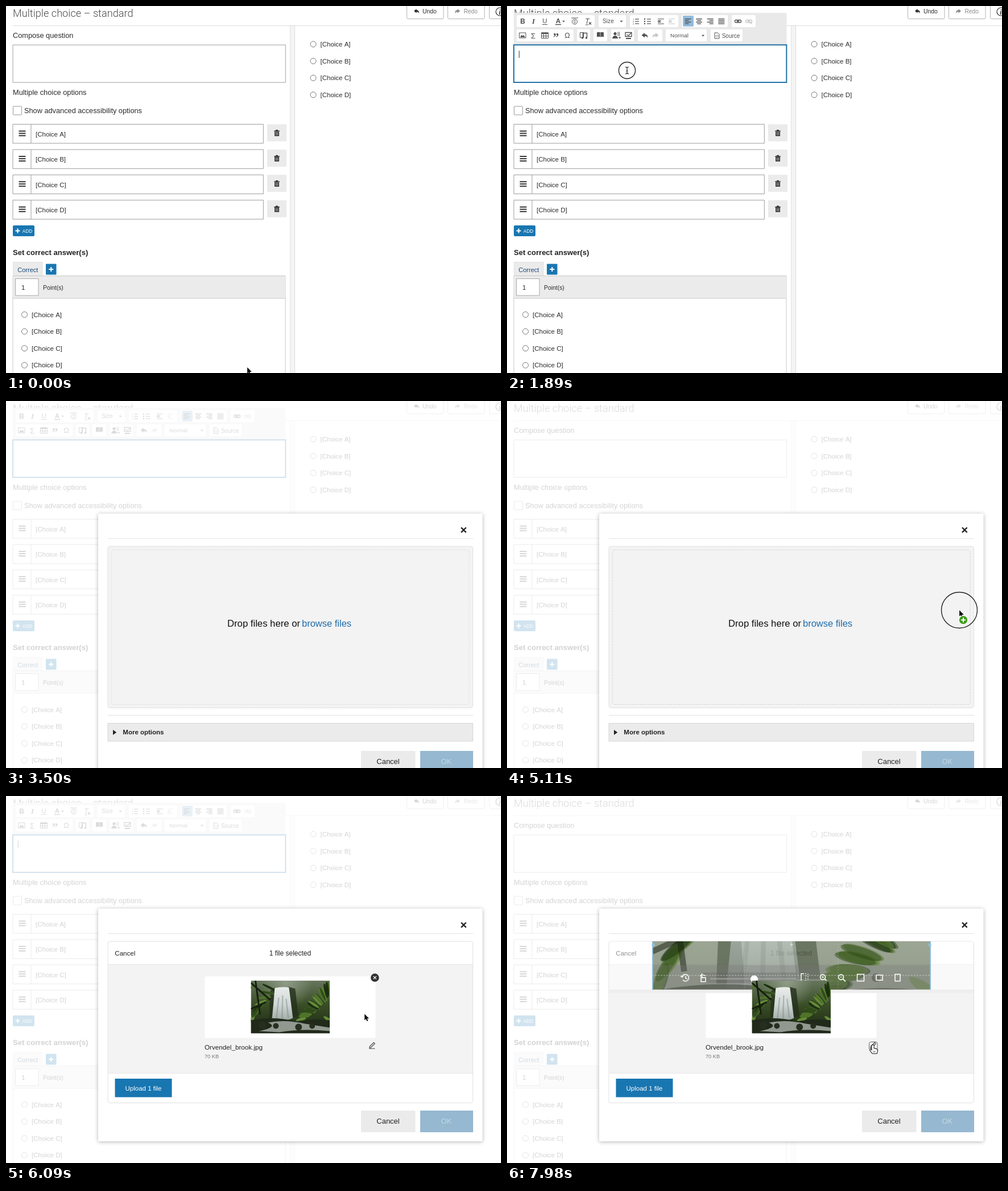
An HTML page with a canvas for the animation above (8 s loop, 870 by 644 pixels).

```html
<!DOCTYPE html>
<html lang="en">
<head>
<meta charset="utf-8">
<title>Question editor</title>
<style>
html, body { margin: 0; width: 100%; height: 100%; overflow: hidden; background: #fff; }
canvas { display: block; width: 870px; height: 644px; }
</style>
</head>
<body>
<canvas id="stage" width="870" height="644"></canvas>
<script>
const c = document.getElementById('stage').getContext('2d');
const LOOP = 8000;
const BLUE = '#1876b1', GREY = '#ebebeb', INK = '#2b2b2b', ICON = '#505050', PALE = '#c6c6c6';
const SANS = '"Liberation Sans", Arial, sans-serif';

// ---- helpers ----
function box(x, y, w, h, fill, stroke, r = 0, lw = 1) {
  c.beginPath();
  c.roundRect(x, y, w, h, r);
  if (fill) { c.fillStyle = fill; c.fill(); }
  if (stroke) { c.strokeStyle = stroke; c.lineWidth = lw; c.stroke(); }
}
function disc(x, y, r, fill, stroke, lw = 1) {
  c.beginPath();
  c.arc(x, y, r, 0, 7);
  if (fill) { c.fillStyle = fill; c.fill(); }
  if (stroke) { c.strokeStyle = stroke; c.lineWidth = lw; c.stroke(); }
}
function text(s, x, y, size, color = INK, style = '', align = 'left', family = SANS) {
  c.font = `${style} ${size}px ${family}`;
  c.textAlign = align;
  c.fillStyle = color;
  c.fillText(s, x, y);
}
function icon(d, x, y, fill, stroke, lw = 1, sx = 1, sy = 1) {
  c.save();
  c.translate(x, y);
  c.scale(sx, sy);
  const p = new Path2D(d);
  if (stroke) { c.strokeStyle = stroke; c.lineWidth = lw; c.stroke(p); }
  if (fill) { c.fillStyle = fill; c.fill(p); }
  c.restore();
}
function line(x1, y1, x2, y2, color, lw = 1) {
  icon(`M${x1} ${y1}L${x2} ${y2}`, 0, 0, null, color, lw);
}
function plus(x, y, r, color, lw) {
  icon(`M${-r} 0H${r}M0 ${-r}V${r}`, x, y, null, color, lw);
}
function cross(x, y, r, color, lw) {
  icon(`M${-r} ${-r}L${r} ${r}M${r} ${-r}L${-r} ${r}`, x, y, null, color, lw);
}
function bars(x, y, widths, color, step = 3, lw = 1.3, left = -5) {
  widths.forEach((w, i) => c.fillRect(x + left, y + (i - (widths.length - 1) / 2) * step - lw / 2, w, lw, c.fillStyle = color));
}
const between = (t, a, b) => t >= a && t < b;

const UNDO = 'M-5-.8L0-5V-2.5C4-2.5 5.6.5 4 4.5C4 1.5 3 .7 0 .7V3.4Z';
const DOWN = 'M-2.6-1.3H2.6L0 1.6Z';

// ---- page ----
const LETTERS = ['A', 'B', 'C', 'D'];

function radios(x, y, gap) {
  LETTERS.forEach((l, i) => {
    disc(x, y + i * 29.6, 5, '#fff', '#777');
    text(`[Choice ${l}]`, x + gap, y + 4 + i * 29.6, 11.5);
  });
}

function page() {
  text('Multiple choice – standard', 12, 18.5, 18.2, '#4a4a4a', '300', 'left', 'Roboto, "Liberation Sans", sans-serif');
  line(12, 34.5, 870, 34.5, '#dcdcdc');
  box(704.5, -8, 64.5, 30.5, '#fff', '#b4b4b4', 2);
  box(776.5, -8, 64.5, 30.5, '#fff', '#b4b4b4', 2);
  box(849.5, -8, 40, 30.5, '#fff', '#b4b4b4', 2);
  icon(UNDO, 721.5, 9.5, INK, null, 1, .9, .9);
  text('Undo', 732, 13.3, 10.4);
  icon(UNDO, 793.5, 9.5, '#8a8a8a', null, 1, -.9, .9);
  text('Redo', 804.5, 13.3, 10.2, '#8a8a8a');
  disc(868, 10, 7, null, INK, 1.2);
  text('i', 868, 14.5, 12, INK, 'italic bold', 'center', '"Liberation Serif", serif');

  box(500, 35, 8, 609, '#f4f4f4');
  line(499.5, 35, 499.5, 644, '#e2e2e2');
  line(507.5, 35, 507.5, 644, '#dcdcdc');

  text('Compose question', 12, 55.7, 12.75);
  text('Multiple choice options', 12, 155.5, 12.8);
  box(12.5, 176, 15, 15, '#fff', '#999', 1);
  text('Show advanced accessibility options', 32, 188.3, 12.75);

  LETTERS.forEach((l, i) => {
    const y = 207.5 + i * 44.4;
    box(12, y, 440.3, 33.4, '#fff', '#9c9c9c');
    line(44, y, 44, y + 33.4, '#9c9c9c');
    bars(28.5, y + 16, [12, 12, 12], INK, 4, 1.9, -6);
    text(`[Choice ${l}]`, 52, y + 21.2, 11.5);
    box(459, y, 34, 30, GREY, null, 1);
    icon('M-5-4H5V-2.8H-5ZM-2-5.5H2V-4H-2ZM-4-2.4H4V5.5H-4Z', 476, y + 15.3, INK);
    for (const dx of [-2, 0, 2]) line(476 + dx, y + 14, 476 + dx, y + 19.4, '#ddd', .8);
  });

  box(12, 385, 38, 19, BLUE, null, 2);
  plus(20.5, 394.5, 4, '#fff', 2);
  text('ADD', 28.7, 397.7, 8.3, '#fff');

  text('Set correct answer(s)', 12, 437, 13, '#222', 'bold');
  box(12, 449, 52, 26, GREY);
  box(12.5, 449.5, 51.5, 26, null, '#e0e0e0');
  box(12, 473.5, 479, 200, '#fff', '#c9c9c9');
  box(12, 474, 479, 39, GREY);
  line(12, 513, 491, 513, '#c9c9c9');
  text('Correct', 20.3, 466.8, 11, '#1a4a78');
  box(70, 452.5, 18.5, 19, BLUE, null, 1);
  plus(79.3, 462, 4, '#fff', 2);
  box(16.5, 478.5, 40.5, 29.5, '#fff', '#a8a8a8');
  text('1', 27, 497.5, 11.5);
  text('Point(s)', 65, 497.5, 10.4);
  radios(32.5, 541.5, 12.5);
  radios(540, 67, 12.5);
}

// ---- rich text field ----
function toolbar(hover) {
  box(12, 12, 479.5, 56, '#e9e9e9', null, [3, 3, 0, 0]);
  const groups = [[[17, 154], [161, 209], [216, 301], [307, 388], [395, 437]],
    [[17, 117], [123, 146], [152, 176], [183, 223], [230, 273], [279, 351], [358, 414]]];
  groups.forEach((row, i) => row.forEach(([a, b]) => box(a, 16 + i * 25, b - a, 21, '#fff', null, 2)));

  text('B', 27.5, 30.7, 12, ICON, 'bold', 'center');
  text('I', 46.5, 30.7, 13, ICON, 'bold italic', 'center', '"Liberation Serif", serif');
  text('U', 66.5, 30, 11.5, ICON, '', 'center');
  line(62, 32.5, 71, 32.5, ICON);
  text('A', 90, 30, 11.5, ICON, 'bold', 'center');
  line(85, 32.5, 95, 32.5, ICON, 1.5);
  icon(DOWN, 99.5, 27, ICON, null, 1, .9, .9);
  disc(119, 27.5, 4.5, null, ICON);
  line(113, 21, 125, 21, ICON);
  line(117, 26, 121, 26, ICON);
  line(117, 29, 121, 29, ICON);
  text('T', 141, 30.5, 12, ICON, 'italic', 'center');
  cross(146, 30.5, 2, ICON, 1.1);
  line(138, 33, 143, 33, ICON);
  text('Size', 168, 30.3, 10.2, ICON);
  icon(DOWN, 201, 27, ICON);
  bars(228, 27, [7, 7, 7], ICON, 4, 1.2, -3);
  ['1', '2', '3'].forEach((n, i) => text(n, 221, 25 + i * 4, 4, ICON));
  bars(248, 27, [7, 7, 7], ICON, 4, 1.2, -2);
  for (const y of [23, 27, 31]) disc(242, y, 1.2, ICON);
  [[270, ICON, 1], [289, PALE, -1]].forEach(([x, col, s]) => {
    bars(x, 27, [11, 6, 6, 11], col, 2.8, 1);
    icon('M-5 0H-1M-3-2L-1 0L-3 2', x + (s < 0 ? -5 : 0), 27, null, col, 1, s);
  });
  box(309, 17, 19, 19, '#92bcde', null, 2);
  [[11, 7, 11, 7], [11, 7, 11, 7], [11, 7, 11, 7], [11, 11, 11, 11]].forEach((ws, i) => {
    ws.forEach((w, k) => {
      const shift = [0, (11 - w) / 2, 11 - w, 0][i];
      c.fillStyle = ICON;
      c.fillRect(312.5 + i * 19.6 + shift, 22 + k * 2.8, w, 1.4);
    });
  });
  [[406, ICON], [425, PALE]].forEach(([x, col]) => {
    box(x - 5.5, 24.5, 6, 4.5, null, col, 2, 1.3);
    box(x - .5, 24.5, 6, 4.5, null, col, 2, 1.3);
    line(x - 3, 26.7, x + 3, 26.7, col);
  });
  cross(429, 30, 1.8, PALE, 1);

  if (hover) box(18, 42, 19, 19, '#d9e6f2', null, 2);
  box(21.5, 47, 11.5, 9, '#fff', ICON);
  icon('M-4.5 3L-1.5-1L.5 1L2-1L4.5 3Z', 27.3, 51.8, ICON);
  text('Σ', 46, 56.5, 13, ICON, '', 'center');
  box(60.5, 47, 12, 9.5, null, ICON);
  box(60.5, 46.5, 12, 2.5, ICON);
  line(60, 52.7, 72, 52.7, ICON);
  line(64.5, 47, 64.5, 56, ICON);
  line(68.5, 47, 68.5, 56, ICON);
  text('”', 86, 62, 21, ICON, 'bold', 'center', '"Liberation Serif", serif');
  text('Ω', 106, 56, 12.5, ICON, '', 'center');
  box(128.5, 46.5, 6, 9, null, ICON);
  icon('M-3 4V-4H4V4', 136.5, 51.5, null, ICON, 1.4);
  disc(132.5, 56, 1.7, ICON);
  disc(139.5, 56, 1.7, ICON);
  icon('M-6-4Q-3-5.5 0-4Q3-5.5 6-4V4Q3 2.5 0 4Q-3 2.5-6 4Z', 164, 50.5, ICON);
  line(164, 47, 164, 54, '#ddd', .8);
  disc(190, 48.5, 2.6, ICON);
  icon('M-5 4Q-4-1 0-1Q4-1 5 4Z', 190, 53, ICON);
  icon('M0-3Q2 0 0 3M2-4Q5 0 2 4', 194.5, 49, null, ICON, 1);
  plus(198, 55.5, 2, ICON, 1);
  box(208, 46.5, 11, 7, null, ICON, 0, 1.3);
  icon('M-3 0L0 2L5-3', 213.5, 50, null, ICON, 1.3);
  line(209, 57, 218, 57, ICON, 2);
  icon(UNDO, 242, 52, ICON, null, 1, 1.1, 1);
  icon(UNDO, 261, 52, PALE, null, 1, -1.1, 1);
  text('Normal', 287, 55.3, 9.95, ICON);
  icon(DOWN, 344.5, 52, ICON);
  icon('M-4-5H1.5L4-2.5V5H-4Z', 369, 52, null, ICON, 1);
  icon('M-.5-1.5L-2 .5L-.5 2.5M.8-1.5L2.3.5L.8 2.5', 369, 52, null, ICON, .9);
  text('Source', 377.7, 55.5, 10, ICON);
}

function field(t, hover) {
  const focus = between(t, 1820, 4340) || between(t, 5950, 7700);
  const bar = between(t, 1820, 4480) || between(t, 5950, 7840);
  if (bar) toolbar(between(t, 2800, 3360));
  box(12, 68.3, 479.3, 65.8, '#fff', focus ? '#2372a8' : hover ? '#6f6f6f' : '#a0a0a0', 0, focus ? 2 : 1);
  const since = t < 5000 ? t - 1820 : t - 5950;
  if (focus && since % 1060 < 530) line(21.3, 78.5, 21.3, 91, '#333');
}

// ---- picture: soft shapes of a forest waterfall ----
function photo(x, y, w, h) {
  c.save();
  c.beginPath();
  c.rect(x, y, w, h);
  c.clip();
  c.translate(x, y);
  c.scale(w / 139, h / 93);
  let g = c.createLinearGradient(0, 0, 0, 93);
  g.addColorStop(0, '#66765c');
  g.addColorStop(.45, '#3a4e27');
  g.addColorStop(1, '#1a2512');
  box(0, 0, 139, 93, g);
  g = c.createRadialGradient(62, 4, 2, 62, 4, 46);
  g.addColorStop(0, '#a4ad9caa');
  g.addColorStop(1, '#a4ad9c00');
  box(0, 0, 139, 60, g);
  icon('M34 18L42 12L46 66H32ZM66 11L78 14L84 64H72Z', 0, 0, '#24301bcc');
  for (let i = 0; i < 60; i++) {
    const u = (i * .618) % 1, v = (i * .381) % 1, right = i % 3;
    c.save();
    c.translate(right ? 86 + u * 54 : u * 34, 12 + v * 62);
    c.rotate((right ? .6 : -.5) + u - v);
    c.beginPath();
    c.ellipse(0, 0, 9 + u * 5, 1.8 + v * 1.4, 0, 0, 7);
    c.fillStyle = ['#4f7327', '#2f4c19', '#1b2e10', '#658a38'][i % 4];
    c.fill();
    c.restore();
  }
  g = c.createLinearGradient(0, 12, 0, 68);
  g.addColorStop(0, '#e9ece9');
  g.addColorStop(.55, '#cfd6d6');
  g.addColorStop(1, '#a4aeaa');
  icon('M42 13Q54 10 67 12Q70 34 74 66Q56 74 37 68Q40 40 42 13Z', 0, 0, g);
  icon('M49 30L45 66M56 26L55 67M62 32L66 66', 0, 0, null, '#6d7c7466', 2.4);
  icon('M0 70Q40 62 80 72Q110 66 139 70V93H0Z', 0, 0, '#20291a');
  icon('M30 74Q60 68 95 76L139 83V89Q90 84 50 91L14 89Q50 82 30 74Z', 0, 0, '#aeb5aecc');
  icon('M0 4L34 34M8 0L16 60M0 50L26 38', 0, 0, null, '#171f0f', 3);
  for (const [px, py, r] of [[44, 80, 5], [84, 82, 6], [108, 80, 5], [20, 79, 7]]) disc(px, py, r, '#262e1f');
  c.restore();
}

// ---- dialog ----
function buttons(y) {
  box(624, y, 95.5, 38, GREY);
  text('Cancel', 671.5, y + 23.2, 13, '#222', '', 'center');
  box(728, y, 93, 38, '#96b8d0');
  text('OK', 774, y + 23.2, 12.7, '#c5d9e6', '', 'center');
}

function dropZone(t) {
  box(179, 255, 641.5, 283.5, '#f3f3f3', '#e0e0e0', 4);
  c.setLineDash([2.5, 2]);
  box(185.5, 261.5, 628.5, 271, null, between(t, 5110, 5600) ? '#d2d2d2' : '#dedede', 3);
  c.setLineDash([]);
  text('Drop files here or ', 389, 396.4, 16.7, '#111');
  text('browse files', 520, 396.4, 16.5, '#1f6cab');
  line(179, 551.5, 821, 551.5, '#e0e0e0');
  box(179, 565.5, 641.5, 31.5, GREY, '#d6d6d6');
  icon('M-3-4.5L3.2 0L-3 4.5Z', 191, 581.5, '#222');
  text('More options', 205.3, 585.3, 11.5, '#222', 'bold');
  buttons(614);
}

function editor(t) {
  const bottom = Math.min(538, 255 + (t - 7880) * .84);
  const mid = bottom - 79;
  c.save();
  c.beginPath();
  c.rect(179, 255, 641, Math.max(0, bottom - 255));
  c.clip();
  c.globalAlpha = .5;
  box(180, 255, 640, bottom - 255, '#fff');
  photo(255, mid - 162, 490, 324);
  c.globalAlpha = .3;
  box(345, bottom - 30, 165, 18, '#555', null, 2);
  box(255, bottom - 43, 490, 43, '#777');
  c.globalAlpha = .8;
  c.setLineDash([3, 2]);
  line(255, mid + 54, 745, mid + 54, '#dfe5df', .8);
  line(418, mid - 162, 418, bottom, '#dfe5df66', .8);
  line(582, mid - 162, 582, bottom, '#dfe5df66', .8);
  c.setLineDash([]);
  line(256, mid - 162, 256, bottom, '#8fc3e4', 2);
  line(744, mid - 162, 744, bottom, '#8fc3e4', 2);
  box(254.5, mid - 2, 5, 5, '#8fc3e4');
  box(740.5, mid - 2, 5, 5, '#8fc3e4');
  plus(500, mid, 3, '#eee', 1);
  c.globalAlpha = 1;
  const y = bottom - 21, W = '#fff';
  icon('M-5-2A6 6 0 1 1-4 4M-8-3L-5-1L-3-4M1-3V1L4 2', 313, y, null, W, 1.5);
  icon('M-4-1H4V6H-4ZM-5-4Q0-7 4-4M-2-8L-5-4L-1-2', 345, y + 1, null, W, 1.5);
  line(357, y + 2, 509, y + 2, '#aaa9', 3);
  disc(434.5, y + 2.5, 6.5, W);
  icon('M-1-7H-6V7H-1', 523, y, null, W, 1.5);
  c.setLineDash([2, 2]);
  icon('M2-8V8M6-7V7', 523, y, null, W, 1.2);
  c.setLineDash([]);
  for (const x of [556, 588]) {
    disc(x - 1, y - 1, 4.5, null, W, 1.6);
    line(x + 2.5, y + 2.5, x + 7, y + 6.5, W, 1.8);
    line(x - 3, y - 1, x + 1, y - 1, W);
  }
  line(555, y - 3, 555, y + 1, W);
  box(615.5, y - 6, 12, 12, null, W, 0, 1.5);
  box(649, y - 4.5, 11, 9, null, W, 0, 1.5);
  box(682, y - 6, 9, 12, null, W, 0, 1.5);
  c.restore();
  if (bottom < 532) box(180, bottom, 640, 6, '#eeeeee');
}

function filePanel(t) {
  const ready = t >= 6090, editing = t >= 7890;
  box(179, 255, 641.5, 283.5, '#fff', '#e0e0e0', 4);
  box(180, 295, 640, ready ? 191 : 243, '#f3f3f3');
  line(180, 295.5, 820, 295.5, '#e6e6e6');
  text('Cancel', 191.3, 279.5, 11.6, '#222');
  text('1 file selected', 499.5, 279.6, 12, '#222', '', 'center');
  box(349.5, 316.5, 300, 108, '#fff', null, 2);
  disc(648.3, 318.8, 7.3, '#333');
  cross(648.3, 318.8, 2.6, '#fff', 1.3);
  text('Orvendel_brook.jpg', 349, 444.5, 11.7, '#222');
  text('70 KB', 349, 460.3, 9.2, '#777');
  if (t >= 7490) box(636.5, 431.5, 14.5, 14.5, null, '#666', 3);
  icon('M-4 2L3-5L5-3L-2 4L-4.5 4.5ZM-5 5.8H5', 643.3, 437.5, null, '#444', 1.1);
  if (ready) {
    line(180, 486.5, 820, 486.5, '#e6e6e6');
    box(191.5, 496, 100, 32.5, BLUE);
    text('Upload 1 file', 241.5, 516.6, 11.5, '#fff', '', 'center');
  }
  if (editing) editor(t);
  if (ready) photo(430.5, 324, 138.5, 92.5);
  buttons(552);
}

function dialog(t) {
  const added = t >= 5880;
  box(0, 0, 870, 644, 'rgba(255,255,255,.8)');
  c.save();
  c.shadowColor = 'rgba(0,0,0,.3)';
  c.shadowBlur = 7;
  c.shadowOffsetY = 1;
  box(162, 197.5, 675.5, added ? 408.5 : 471, '#fff', null, 2);
  c.restore();
  line(179, 241.5, 821, 241.5, '#e4e4e4');
  cross(804.3, 226.3, 4.3, '#222', 2.4);
  if (added) filePanel(t); else dropZone(t);
}

// ---- pointer ----
const PATH = [[0, 424, 634], [840, 79, 190], [880, 79, 190], [1540, 211, 113], [2060, 211, 113],
  [2870, 27, 53], [3500, 27, 53], [3501, 795, 367], [5110, 795, 367], [5600, 633, 381], [6050, 633, 381],
  [6580, 465, 464], [6670, 465, 464], [7100, 657, 449], [7280, 643, 438], [LOOP, 643, 438]];

function pointerAt(t) {
  const i = PATH.findIndex(k => k[0] > t);
  const [a, b] = [PATH[i - 1], PATH[i]];
  const u = (t - a[0]) / (b[0] - a[0]), e = u * u * (3 - 2 * u);
  return [a[1] + (b[1] - a[1]) * e, a[2] + (b[2] - a[2]) * e];
}

// press start, release, largest ring
const PRESSES = [[1850, 1955, 20], [2940, 3220, 25], [5110, 5600, 31.5], [7420, 7555, 12]];

const inField = (x, y) => x > 12 && x < 491 && y > 68 && y < 134;
const inRow = (x, y) => x > 44 && x < 452 && y > 207 && y < 375 && (y - 207.5) % 44.4 < 33.4;

function pointer(t, x, y) {
  if (between(t, 3500, 5110)) return;
  for (const [a, b, max] of PRESSES) {
    if (between(t, a, b)) disc(x, y, a === 5110 ? max : Math.min(max, 12 + (t - a) / 16), null, '#222', 1.4);
  }
  if (t < 3360 && (inField(x, y) || inRow(x, y))) {
    const beam = 'M-3-6Q0-6 0-4Q0-6 3-6M0-4.5V4.5M-3 6Q0 6 0 4Q0 6 3 6M-1.5 1H1.5';
    icon(beam, x, y, null, '#fff', 2.6);
    icon(beam, x, y, null, '#222', 1.2);
  } else if (between(t, 2100, 3360) || t > 7230) {
    icon('M-1.6 0Q0-1.8 1.5 0V5L6.5 6.2Q8.5 7 8 9.5L6.8 13.5H-.8L-4.6 8.6Q-4.8 6.6-3 7.4L-1.6 8.8Z', x, y, '#fff', '#111', 2);
    line(x + 1, y + 9, x + 1, y + 12, '#333', .8);
    line(x + 3.5, y + 9, x + 3.5, y + 12, '#333', .8);
  } else {
    icon('M0 0V13L3 10.3L5 15L7.3 14L5.3 9.5H9.4Z', x, y, '#111', '#fff', 2, .85, .85);
    if (between(t, 5110, 5600)) {
      disc(x + 7, y + 17.3, 7.5, '#3f9c1c', '#fff', .8);
      plus(x + 7, y + 17.3, 4, '#fff', 2);
    }
  }
}

function frame() {
  const t = performance.now() % LOOP;
  const [x, y] = pointerAt(t);
  box(0, 0, 870, 644, '#fff');
  page();
  field(t, t < 1820 && inField(x, y));
  if (t >= 3360) dialog(t);
  pointer(t, x, y);
  requestAnimationFrame(frame);
}
frame();
</script>
</body>
</html>
```
